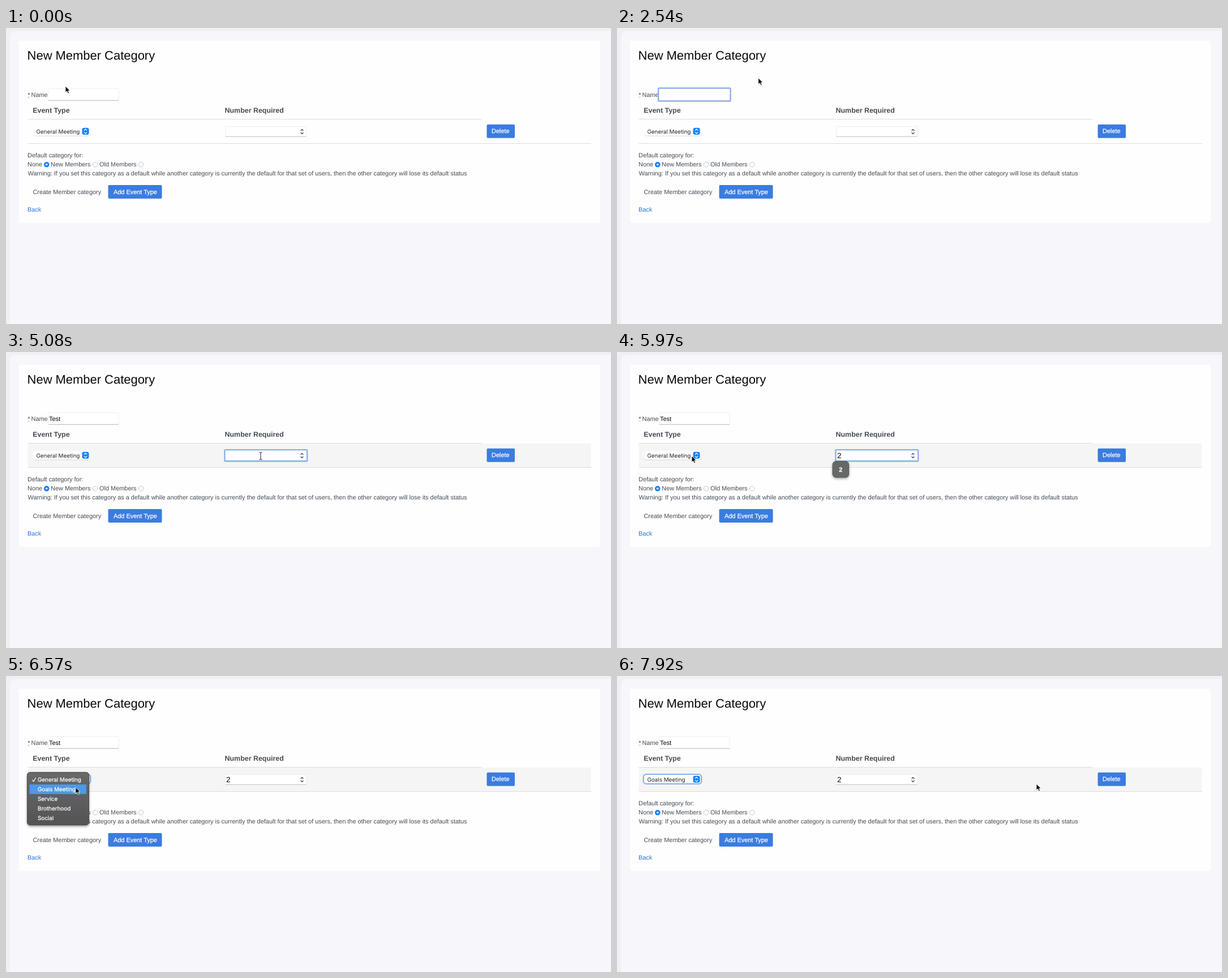
Recreate the animation shown at these times as an HTML page. Size 1069x524 px, loop 8 s.

```html
<!DOCTYPE html>
<html lang="en">
<head>
<meta charset="utf-8">
<title>New Member Category</title>
<style>
  html, body { margin: 0; width: 100%; height: 100%; overflow: hidden; background: #f0f0f4; }
  svg { display: block; width: 1069px; height: 524px; }
  text { font: 10.93px "Liberation Sans", Arial, sans-serif; fill: #454b52; text-rendering: geometricPrecision; white-space: pre; }
  .title { font-size: 21.95px; fill: #080808; }
  .head { font-size: 12.45px; font-weight: bold; }
  .sys { font-family: Inter, sans-serif; font-size: 9.85px; fill: #222; }
  .entry { fill: #000; }
  .white { fill: #fff; stroke: #fff; stroke-width: .25px; }
  .button { fill: #3b7cdf; }
  .field { fill: #fff; stroke: #eee; }
  .ring { fill: none; stroke: #86aef0; stroke-width: 2.2px; }
  .line { fill: none; stroke: #dcdde0; }
  .radio { fill: #fff; stroke: #b9b9b9; stroke-width: .8px; }
  .chevron { fill: none; stroke-width: 1.2px; stroke-linecap: round; stroke-linejoin: round; }
</style>
</head>
<body>
<svg viewBox="0 0 1069 524">
  <defs>
    <filter id="soft" x="-30%" y="-30%" width="160%" height="160%">
      <feDropShadow dx="0" dy="2" stdDeviation="2" flood-opacity=".35"/>
    </filter>
    <filter id="faint" x="-10%" y="-30%" width="120%" height="170%">
      <feDropShadow dx="0" dy=".5" stdDeviation=".6" flood-opacity=".3"/>
    </filter>
    <linearGradient id="dark" x2="0" y2="1">
      <stop stop-color="#686868"/><stop offset="1" stop-color="#535456"/>
    </linearGradient>
  </defs>

  <path d="M7 524V17Q7 5 19 5H1069V524Z" fill="#f6f6fb"/>
  <rect x="23" y="22.5" width="1026.5" height="322.5" rx="3" fill="#fefefe"/>
  <text class="title" x="37.6" y="55.6">New Member Category</text>

  <text x="38.3" y="121.6">*</text>
  <path d="M38.5 122.5h3" stroke="#777" stroke-dasharray="1"/>
  <text x="44.5" y="121.6">Name</text>
  <rect class="field" x="74.5" y="107.5" width="124.5" height="20.5" rx="1"/>
  <path d="M75 128.3h124" stroke="#bcbcbc"/>
  <rect id="nameRing" class="ring" x="73" y="106.3" width="127.6" height="23.2" rx="1.5"/>
  <text id="name" class="entry" x="76" y="121.6"></text>

  <text class="head" x="47.2" y="150">Event Type</text>
  <text class="head" x="386.5" y="150">Number Required</text>
  <rect id="row" x="38.5" y="162" width="995" height="42.5" fill="#f5f5f5"/>
  <path class="line" d="M38.5 161.5H840M38.5 204.5H1034"/>

  <rect x="48" y="175" width="100.5" height="15.6" rx="4" fill="#fff" filter="url(#faint)"/>
  <text id="choice" class="sys" x="53.5" y="187"></text>
  <rect x="134.5" y="176.8" width="12" height="12" rx="3" fill="#1680fa"/>
  <path class="chevron" stroke="#fff" d="M138.2 181.2l2.3-2.2 2.3 2.2M138.2 184.6l2.3 2.2 2.3-2.2"/>
  <rect id="choiceRing" class="ring" x="46.7" y="174" width="102.6" height="17" rx="5"/>

  <rect class="field" x="387.5" y="174.5" width="143" height="17.5"/>
  <path d="M388 192.2h142.5" stroke="#c4c4c4"/>
  <path class="chevron" stroke="#444" d="M520.9 181.7l2.1-2.3 2.1 2.3M520.9 185.2l2.1 2.3 2.1-2.3"/>
  <rect id="countRing" class="ring" x="386.3" y="173" width="146" height="20.3" rx="1.5"/>
  <text id="count" class="entry" x="389" y="188" style="font-size:13.3px">2</text>
  <path id="caret" stroke="#222"/>

  <rect class="button" x="849.5" y="170.8" width="49.5" height="24" rx="2"/>
  <text class="white" x="858" y="186.3">Delete</text>

  <text x="38" y="229">Default category for:</text>
  <text x="38" y="245.2">None</text>
  <text x="79" y="245.2">New Members</text>
  <text x="165" y="245.2">Old Members</text>
  <circle cx="71.7" cy="241.8" r="4.8" fill="#1680fa"/>
  <circle cx="71.7" cy="241.8" r="1.8" fill="#fff"/>
  <circle class="radio" cx="157.6" cy="241.8" r="4.3"/>
  <circle class="radio" cx="238.7" cy="241.8" r="4.3"/>
  <text x="38.5" y="261.3">Warning: If you set this category as a default while another category is currently the default for that set of users, then the other category will lose its default status</text>

  <text x="47.4" y="293.7">Create Member category</text>
  <rect class="button" x="180.5" y="278" width="95" height="24" rx="2"/>
  <text class="white" x="190" y="293.7">Add Event Type</text>
  <text x="38" y="324.6" style="fill:#2a74e0">Back</text>

  <g id="hint">
    <rect x="381" y="193.5" width="28.7" height="28.5" rx="6" fill="#666768" stroke="#555" filter="url(#soft)"/>
    <text class="white" x="395.3" y="211.8" text-anchor="middle" style="font-weight:bold">2</text>
  </g>

  <g id="menu">
    <rect x="37.5" y="170.5" width="109" height="93.5" rx="5" fill="url(#dark)" stroke="#4c4c4c" filter="url(#soft)"/>
    <rect id="hover" x="41.5" width="100.5" height="17" fill="#4f97e8"/>
    <path class="chevron" stroke="#fff" d="M46.8 184.2l2 2.6 3.6-6.6"/>
  </g>

  <path id="arrow" d="M0 0V11.2L2.6 8.8L4.5 13L6.5 12.1L4.7 8.1H8.2Z" fill="#000" stroke="#fff" stroke-width=".9"/>
  <path id="beam" d="M-2.5-6.5Q0-6.5 0-5Q0-6.5 2.5-6.5M0-5V5M-2.5 6.5Q0 6.5 0 5Q0 6.5 2.5 6.5" fill="none" stroke="#222"/>
</svg>

<script>
const LOOP = 8000;
const $ = id => document.getElementById(id);
const options = ["General Meeting", "Goals Meeting", "Service", "Brotherhood", "Social"];

options.forEach((label, i) => {
  const item = $("choice").cloneNode();
  item.removeAttribute("id");
  item.setAttribute("class", "sys white");
  item.setAttribute("x", 56);
  item.setAttribute("y", 187 + 17 * i);
  item.textContent = label;
  $("menu").append(item);
});

// Pointer stops: time, x, y, and 1 where it is a text beam
const stops = [
  [0, 105, 103], [300, 105, 107], [440, 106, 119, 1], [590, 107, 120, 1],
  [1190, 120, 119, 1], [1340, 185, 106], [1490, 236, 92], [1640, 249.7, 88.5],
  [3740, 262, 96], [3890, 330, 138], [4040, 428, 188], [4180, 462, 201], [4330, 453, 188, 1], [4480, 450, 184, 1],
  [5530, 420, 184, 1], [5680, 300, 184], [5820, 175, 183], [5970, 132, 184],
  [6270, 130, 188], [6420, 124, 197], [6570, 122.8, 197],
  [7620, 133, 196], [7770, 420, 193], [7920, 741, 191]
];
const typed = [[2690, "T"], [2840, "Te"], [3140, "Tes"], [3290, "Test"]];

const latest = (list, t) => list.findLast(entry => entry[0] <= t);
const show = (id, on) => $(id).setAttribute("opacity", +on);

function render(t) {
  const within = (a, b) => t >= a && t < b;

  $("name").textContent = latest(typed, t)?.[1] ?? "";
  show("nameRing", within(1040, 4480));
  show("row", t >= 4040);
  show("countRing", within(4480, 6120));
  show("count", t >= 5380);
  show("hint", within(5380, 6120));
  show("choiceRing", t >= 6120);
  $("choice").textContent = options[t < 7770 ? 0 : 1];

  show("caret", within(1040, 1640) || within(1940, 2540) || within(4480, 5080));
  $("caret").setAttribute("d", t < 4000 ? "M76.5 112v13" : "M389.5 176v14");

  show("menu", t < 6120 || t >= 7770 ? 0 : t < 7620 ? 1 : .58);
  $("hover").setAttribute("y", t < 6420 ? 175 : 192);

  const [, x, y, beam] = latest(stops, t);
  for (const id of ["arrow", "beam"]) $(id).setAttribute("transform", `translate(${x} ${y})`);
  show("arrow", !beam);
  show("beam", beam || 0);
}

function frame(now) {
  render(now % LOOP);
  requestAnimationFrame(frame);
}
render(0);
requestAnimationFrame(frame);
</script>
</body>
</html>
```
